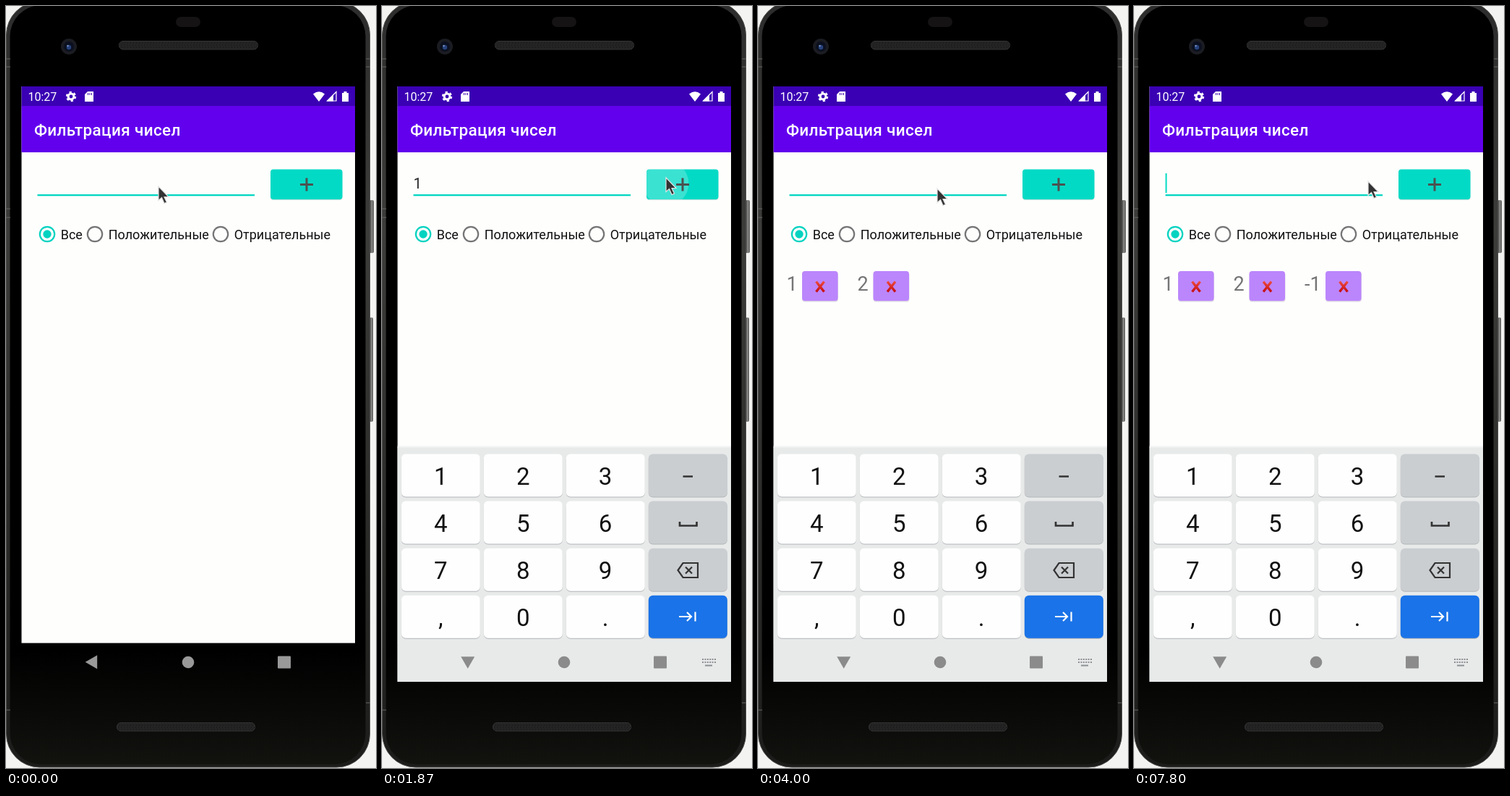
Recreate the animation shown at these times as an HTML page. Size 512x1052 px, loop 8000 ms.

```html
<!DOCTYPE html>
<html lang="ru">
<head>
<meta charset="utf-8">
<title>Фильтрация чисел</title>
<style>
  html, body { margin: 0; width: 100%; height: 100%; overflow: hidden; background: #f3f3f2; }
  svg { display: block; width: 100vw; height: 100vh; font-family: Roboto, "Noto Sans", sans-serif; }
  .line { fill: none; stroke-width: 2.2; }
</style>
</head>
<body>
<svg viewBox="0 0 512 1052">
  <defs>
    <pattern id="mesh" width="4" height="6" patternUnits="userSpaceOnUse">
      <rect width="4" height="6" fill="#0b0b0b"/>
      <path d="M0 0L2 3L0 6M2 0L4 3L2 6" fill="none" stroke="#484848" stroke-width=".8"/>
    </pattern>
    <linearGradient id="side">
      <stop stop-color="#222"/><stop offset=".5" stop-color="#8c8c8a"/><stop offset="1" stop-color="#555"/>
    </linearGradient>
    <linearGradient id="rim" x2="0" y2="1">
      <stop stop-color="#2c2c2c"/><stop offset=".3" stop-color="#3c3c3a"/><stop offset="1" stop-color="#1c1c1a"/>
    </linearGradient>
    <linearGradient id="glass" x2="0" y2="1">
      <stop offset=".85"/><stop offset="1" stop-color="#12120f"/>
    </linearGradient>
    <linearGradient id="red" x2="0" y2="1">
      <stop stop-color="#ee4a3c"/><stop offset="1" stop-color="#c40d12"/>
    </linearGradient>
    <clipPath id="screen"><rect x="21.5" y="111" width="461.5" height="822"/></clipPath>
    <clipPath id="button"><rect x="366" y="225.5" width="99.5" height="41.5" rx="4"/></clipPath>
  </defs>

  <!-- phone -->
  <rect x="503" y="268" width="6" height="73" rx="2" fill="url(#side)"/>
  <rect x="503" y="430" width="5" height="144" rx="2" fill="url(#side)"/>
  <rect x=".5" y="-6" width="503" height="1057" rx="46" fill="url(#rim)" stroke="#4a4a48"/>
  <rect x="5.5" y="-1" width="492" height="1048" rx="43" fill="url(#glass)"/>
  <path d="M0 73h6M0 84h6M498 73h6M498 84h6M0 280h6M0 292h6M498 962h6M0 972h6" stroke="#666"/>
  <rect x="235" y="15" width="34" height="14" rx="7" fill="#151313"/>
  <circle cx="87" cy="56" r="11" fill="#1b1c21"/>
  <circle cx="87" cy="56" r="7" fill="#0b1020"/>
  <circle cx="87" cy="57" r="3.2" fill="#27427c"/>
  <circle cx="85.5" cy="55" r="1.2" fill="#8096c4"/>
  <g fill="url(#mesh)" stroke="#333">
    <rect x="156.5" y="48.5" width="192" height="11.5" rx="5.5"/>
    <rect x="153.5" y="989.5" width="191" height="11.5" rx="5.5"/>
  </g>

  <!-- app -->
  <rect x="21.5" y="111" width="461.5" height="768.5" fill="#fefefd"/>
  <rect x="21.5" y="111" width="461.5" height="28" fill="#3a00b3"/>
  <rect x="21.5" y="138" width="461.5" height="64" fill="#6200ee"/>
  <g fill="#fff">
    <text x="30.5" y="131" font-size="16">10:27</text>
    <text x="39" y="179" font-size="22.5" font-weight="500" letter-spacing=".35">Фильтрация чисел</text>
    <g fill="none" stroke="#fff">
      <circle cx="90" cy="125" r="3.9" stroke-width="3"/>
      <circle cx="90" cy="125" r="6" stroke-width="2.4" stroke-dasharray="3.14"/>
    </g>
    <path d="M113 118h8v14h-12v-10z"/>
    <path d="M113.5 120v3M116 120v3M118.5 120v3" stroke="#3a00b3"/>
    <path d="M425 121.5q8-6.5 16 0l-8 10.5z"/>
    <path d="M444.5 131L457 118.5V131z" fill="none" stroke="#fff" stroke-width="1.2"/>
    <path d="M444 131.5l9-9v9z"/>
    <path d="M465 120h2.5v-2h4v2h2.5v12h-9z"/>
  </g>
  <rect x="43.5" y="260" width="300.5" height="2.3" fill="#03d6c2"/>
  <text id="field" x="43.5" y="252" font-size="20.2" fill="#222"></text>
  <rect id="caret" y="231" width="2" height="27" fill="#03dac5"/>
  <rect x="366" y="227" width="99.5" height="41" rx="4" fill="#d3e0de"/>
  <rect x="366" y="225.5" width="99.5" height="41.5" rx="4" fill="#03dac5"/>
  <g clip-path="url(#button)"><circle id="ripple" fill="#fff"/></g>
  <path d="M407 246.5h18M416 237.5v18" stroke="#4b5250" stroke-width="3"/>
  <g id="radios" font-size="18" fill="#111"></g>
  <g id="items" font-size="27" fill="#757575"></g>

  <!-- keyboard and navigation -->
  <g clip-path="url(#screen)">
    <rect id="navBack" x="21" y="879" width="463" height="55" fill="#e8eaea"/>
    <g id="keys" font-size="33" text-anchor="middle" fill="#111"></g>
    <g id="nav">
      <path id="back" d="M-9.5-7.5h19L0 9z"/>
      <circle cx="252" cy="906" r="8.3"/>
      <rect x="376" y="897.5" width="18" height="17" rx="1"/>
    </g>
    <g id="switcher" stroke="#8d9092" stroke-width="2" fill="none">
      <path d="M443 902h19M443 906h19" stroke-dasharray="2 1.4"/><path d="M447 910.5h10"/>
    </g>
  </g>
  <path id="cursor" d="M0 0V19.5L4.5 15.5L8 23.5L11.5 22L8 14.5H14Z" fill="#333" stroke="#e4e4e4" stroke-width="1.2"/>
</svg>
<script>
const LOOP = 8000, STEP = 1000 / 15;
const $ = id => document.getElementById(id);
const set = (el, attrs) => { for (const k in attrs) el.setAttribute(k, attrs[k]); };
const clamp = v => Math.min(1, Math.max(0, v));

$('radios').innerHTML = [['Все', 57], ['Положительные', 123], ['Отрицательные', 297]].map(([label, x], i) => {
  const color = i ? '#757575' : '#03d3c0';
  return `<circle class="line" cx="${x}" cy="315" r="10.2" stroke="${color}"/>` +
    (i ? '' : `<circle cx="${x}" cy="315" r="5.7" fill="${color}"/>`) +
    `<text x="${x + 18.7}" y="321.5">${label}</text>`;
}).join('');

const key = (col, row, fill) => {
  const x = 26.8 + col * 114, y = 618.5 + row * 65.1;
  const box = (dy, color) => `<rect x="${x}" y="${y + dy}" width="109" height="59" rx="6" fill="${color}"/>`;
  return box(1, '#b4b7b9') + box(0, fill);
};
let keys = '<rect x="21" y="609" width="463" height="330" fill="#e8eaea"/><path d="M21 608.5h463" stroke="#f3f4f4" stroke-width="2"/>';
[...'123456789,0.'].forEach((label, i) => {
  const col = i % 3, row = Math.floor(i / 3);
  keys += key(col, row, '#fefefe') + `<text x="${81.3 + col * 113.9}" y="${660.7 + row * 65.1}">${label}</text>`;
});
for (let row = 0; row < 4; row++) keys += key(3, row, row < 3 ? '#cbced1' : '#1a73e8');
keys += `<g class="line" stroke="#333">
  <path d="M416.5 649.5h13.5M412 712v5.5h23.5v-5.5" stroke-width="2.7"/>
  <path d="M409.5 779l7-10h20.5v20h-20.5zM420 774.5l9 9m0-9l-9 9"/>
  <path d="M411 843h17m-6-6l6 6l-6 6M433.5 836.5v13" stroke="#fff"/></g>`;
$('keys').innerHTML = keys;

$('items').innerHTML = [['1', 39.5, 61], ['2', 137.5, 159.5], ['-1', 236, 265]].map(([n, x, bx]) =>
  `<g><text x="${x}" y="393">${n}</text>
   <rect x="${bx}" y="367.5" width="50" height="41" rx="4" fill="#ddd6e5"/>
   <rect x="${bx}" y="366" width="49.5" height="41" rx="4" fill="#bb86fc"/>
   <path transform="translate(${bx + 25} 387.5)" d="M-5.5-7L5.5 7M5.5-7L-5.5 7" stroke="url(#red)" stroke-width="3.4"/></g>`).join('');

const path = [
  [0, 211, 249], [270, 199, 244], [1200, 199, 244], [1530, 391, 235], [1600, 391, 235], [1670, 393, 237],
  [2400, 393, 237], [2600, 393, 242], [3600, 393, 242], [4000, 248, 252], [5600, 248, 252],
  [5870, 455, 263], [6000, 470, 261], [6200, 428, 222], [6400, 428, 222], [6530, 408, 236],
  [7100, 408, 236], [7470, 327, 242], [7530, 327, 242], [7600, 324, 242], [LOOP, 324, 242]
];
const typing = [[0, ''], [1067, '1'], [2067, ''], [2800, '2'], [3533, ''], [4800, '-'], [5200, '-1'], [6800, '']];
const caretOn = [[67, 530], [1067, 1530], [2067, 2530], [2800, 3266], [3533, 3999], [4599, 5730], [6199, 7266], [7799, LOOP]];
const taps = [[1866, 393, 245], [3400, 393, 245], [6666, 410, 245]];
const added = [2067, 3533, 6800];
const caretOffset = { '': 0, '1': 11.5, '2': 11.5, '-': 5.5, '-1': 16.5 };

function cursorAt(t) {
  const i = path.findIndex(p => p[0] > t);
  const [t0, x0, y0] = path[i - 1], [t1, x1, y1] = path[i];
  const u = (t - t0) / (t1 - t0);
  return [x0 + (x1 - x0) * u, y0 + (y1 - y0) * u];
}

function draw(now) {
  // Motion advances at 15 steps a second
  const t = Math.floor((now % LOOP + 4) / STEP) * STEP % LOOP + 0.5;

  const text = typing.filter(e => e[0] <= t).pop()[1];
  $('field').textContent = text;
  set($('caret'), { x: 43.5 + caretOffset[text], opacity: +caretOn.some(([a, b]) => t >= a && t < b) });
  [...$('items').children].forEach((item, i) => set(item, { opacity: +(t >= added[i]) }));

  const tap = taps.find(([start]) => t >= start && t < start + 500);
  if (tap) {
    const age = t - tap[0];
    set($('ripple'), { cx: tap[1], cy: tap[2], r: 31 + age * 0.3, opacity: 0.22 * clamp((500 - age) / 300) });
  } else set($('ripple'), { opacity: 0 });

  const rise = clamp((t - 533.3) / 266.7);
  const shade = Math.round(153 - 14 * rise);
  set($('keys'), { transform: `translate(0 ${rise ? 326 * (1 - rise) ** 3 : 400})` });
  set($('navBack'), { opacity: clamp(rise * 2) });
  set($('nav'), { fill: `rgb(${shade},${shade},${shade})` });
  set($('back'), { transform: `translate(118.7 905.7) rotate(${90 * (1 - rise)})` });
  set($('switcher'), { opacity: rise });

  set($('cursor'), { transform: `translate(${cursorAt(t)})` });
}

const begin = performance.now();
function tick() {
  draw(performance.now() - begin);
  requestAnimationFrame(tick);
}
tick();
</script>
</body>
</html>
```
